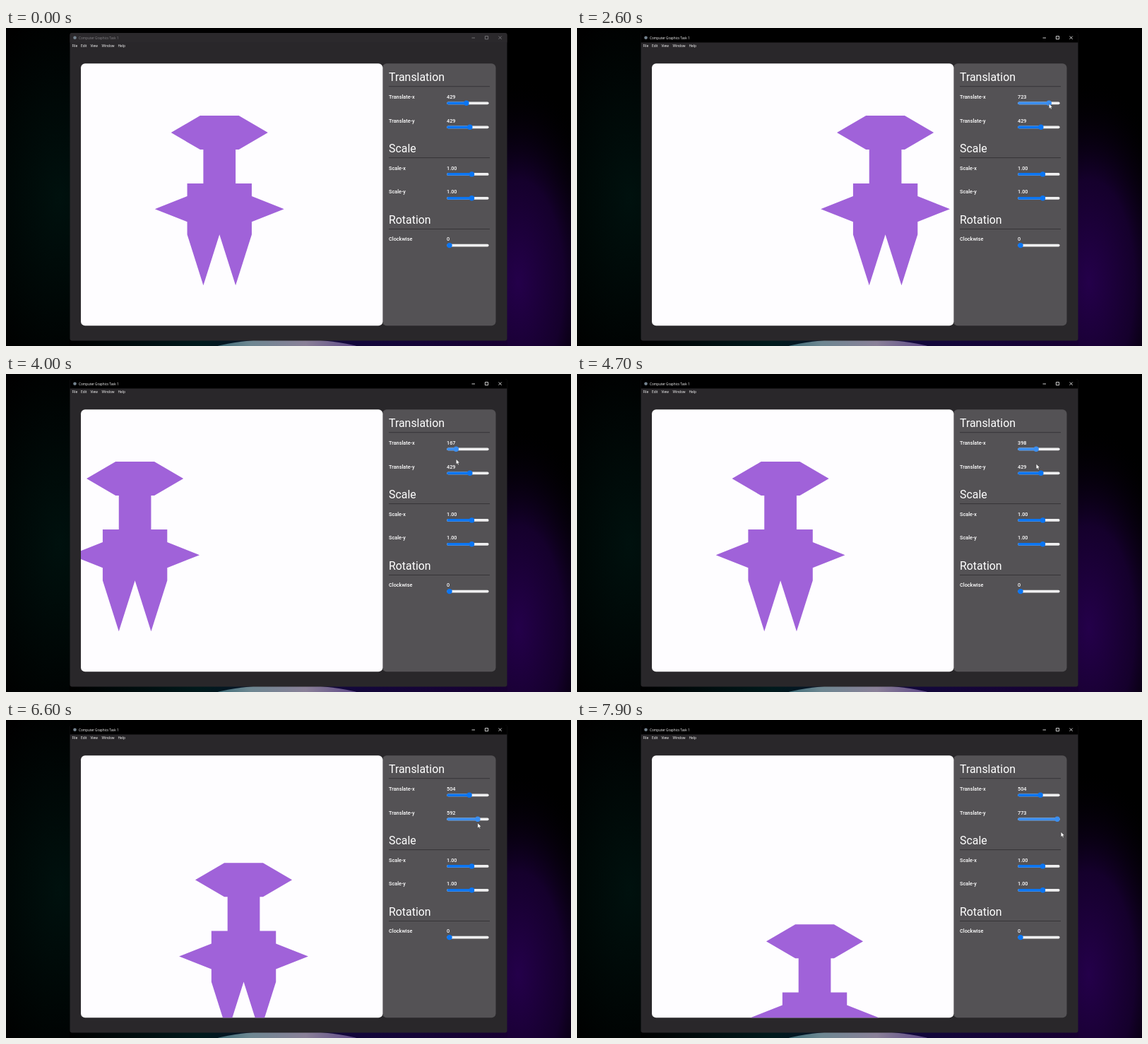
Animation of 800 by 450 pixels, one loop 8000 ms. Source, as an HTML page:

```html
<!DOCTYPE html>
<html lang="en">
<head>
<meta charset="utf-8">
<title>Transform sliders</title>
<style>
  html, body { margin: 0; width: 100%; height: 100%; overflow: hidden; background: #000; }
  svg { display: block; width: 100vw; height: 100vh; }
  text { fill: #fff; font: 500 7.3px Roboto, sans-serif; }
  .head { font-size: 15.9px; font-weight: 400; }
  .bar { font: 500 4.8px "Open Sans", sans-serif; }
  #title { font-size: 4.65px; }
</style>
</head>
<body>
<svg viewBox="0 0 800 450">
  <defs>
    <radialGradient id="green">
      <stop stop-color="#00110e"/><stop offset="1" stop-color="#000"/>
    </radialGradient>
    <radialGradient id="purple">
      <stop stop-color="#24004a"/><stop offset=".5" stop-color="#15002c"/>
      <stop offset="1" stop-color="#000" stop-opacity="0"/>
    </radialGradient>
    <linearGradient id="floor">
      <stop stop-color="#000"/><stop offset=".3" stop-color="#001a1c"/>
      <stop offset=".6" stop-color="#12083c"/><stop offset="1" stop-color="#180032"/>
    </linearGradient>
    <linearGradient id="glow">
      <stop stop-color="#1f5a66"/><stop offset=".3" stop-color="#6d8791"/>
      <stop offset=".6" stop-color="#8a8098"/><stop offset="1" stop-color="#4a2f80"/>
    </linearGradient>
    <clipPath id="view"><rect x="106" y="50.3" width="427.4" height="371" rx="6"/></clipPath>
  </defs>

  <rect width="800" height="450"/>
  <ellipse cx="75" cy="240" rx="130" ry="270" fill="url(#green)"/>
  <ellipse cx="725" cy="360" rx="130" ry="290" fill="url(#purple)"/>
  <rect x="90" y="440" width="620" height="10" fill="url(#floor)"/>
  <ellipse cx="398" cy="470" rx="132" ry="30" fill="url(#glow)"/>

  <rect x="90.5" y="7" width="619" height="435.5" rx="3" fill="#29272a"/>
  <path id="titleBar" d="M90.5 20.5V10a3 3 0 0 1 3-3h613a3 3 0 0 1 3 3v10.5z"/>
  <circle cx="97.5" cy="13.8" r="2.3" fill="#74838f"/>
  <text id="title" class="bar" x="103" y="15.6">Computer Graphics Task 1</text>
  <path id="buttons" fill="none" stroke-width=".8" d="M659.5 14h4.5M678.4 11.6h4.2v4.2h-4.2zM697.5 11.6l4.2 4.2m0-4.2l-4.2 4.2"/>
  <g class="menu">
    <text class="bar" y="26.6"><tspan x="93.5">File</tspan><tspan x="106">Edit</tspan><tspan x="119.5">View</tspan><tspan x="135.5">Window</tspan><tspan x="158.5">Help</tspan></text>
  </g>

  <rect x="533" y="50.3" width="160.5" height="371" rx="6" fill="#545255"/>
  <rect x="106" y="50.3" width="427.4" height="371" rx="6" fill="#fefdff"/>
  <g clip-path="url(#view)">
    <path id="shape" fill="#a062d9" d="M-150-225L-60-275H60L150-225L60-175H50V-75H100V-37.5L200 0L100 37.5V75L50 225L0 75L-50 225L-100 75V37.5L-200 0L-100-37.5V-75H-50V-175H-60z"/>
  </g>
  <g id="panel"></g>
  <path id="cursor" fill="#fff" stroke="#222" stroke-width=".4" d="M0 0V7.2L1.7 5.7L2.8 8.1L4 7.6L2.9 5.2H5.1z"/>
</svg>
<script>
const LOOP = 8000, STEP = 100;
const MAX_X = 933, MAX_Y = 773;
const ENTER = 600, GRAB_X = 1600, DROP_X = 5400, GRAB_Y = 5900;
const $ = id => document.getElementById(id);
const set = (id, name, value) => $(id).setAttribute(name, value);

function add(tag, attrs, text = '') {
  const el = document.createElementNS('http://www.w3.org/2000/svg', tag);
  for (const key in attrs) el.setAttribute(key, attrs[key]);
  el.textContent = text;
  $('panel').append(el);
  return el;
}

function heading(text, y) {
  add('text', { class: 'head', x: 542, y }, text);
  add('rect', { x: 542, y: y + 7, width: 143, height: 1, fill: '#363437' });
}

const thumbX = part => 628 + 52 * part;

// Returns a setter: fraction of the track, shown value, highlighted or not
function slider(label, y) {
  const track = { x: 624.3, y: y + 4.5, width: 59.3, height: 3.8, rx: 1.9 };
  add('text', { x: 542, y }, label);
  const value = add('text', { x: 624, y });
  add('rect', { ...track, fill: '#efeff0' });
  const fill = add('rect', track);
  const thumb = add('circle', { cy: y + 6.4, r: 3.7 });
  return (part, text, hot) => {
    const x = thumbX(part), color = hot ? '#3b8ef0' : '#0b75f2';
    value.textContent = text;
    fill.setAttribute('width', x - track.x);
    thumb.setAttribute('cx', x);
    fill.setAttribute('fill', color);
    thumb.setAttribute('fill', color);
  };
}

// Smooth moves through [time, value] stops
function glide(stops, t) {
  let [start, value] = stops[0];
  for (const [end, next] of stops) {
    const p = Math.min(1, Math.max(0, (t - start) / (end - start || 1)));
    value += (next - value) * p * p * (3 - 2 * p);
    start = end;
  }
  return value;
}

const dragX = [[GRAB_X, 429], [2600, 723], [3500, 28], [4700, 398], [5300, 504]];
const dragY = [[GRAB_Y, 429], [6600, 592], [7000, 25], [7500, 25], [7900, 850]];

// The pointer comes in, then stays on the dragged thumb and drifts down
function pointer(t, x, y) {
  if (t < GRAB_X) return [
    glide([[500, 484], [1200, 662], [GRAB_X, 652]], t),
    glide([[500, 402], [1200, 195], [GRAB_X, 106]], t)
  ];
  return [thumbX(t < GRAB_Y ? x / MAX_X : y / MAX_Y), 106 + Math.max(0, t - 2500) * .0097];
}

heading('Translation', 75.2);
const setX = slider('Translate-x', 99.9);
const setY = slider('Translate-y', 133.9);
heading('Scale', 176.1);
slider('Scale-x', 200.5)(.606, '1.00');
slider('Scale-y', 234.4)(.606, '1.00');
heading('Rotation', 277);
slider('Clockwise', 301.2)(0, '0');

function draw(now) {
  const t = Math.floor(now % LOOP / STEP) * STEP;
  const x = glide(dragX, t), pull = glide(dragY, t), y = Math.min(MAX_Y, pull);
  const focused = t >= GRAB_X, ink = focused ? '#fff' : '#858387';

  setX(x / MAX_X, Math.round(x), focused && t < DROP_X);
  setY(y / MAX_Y, Math.round(y), t >= GRAB_Y);
  set('shape', 'transform',
    `translate(${106.2 + x * .457} ${50 + y * .4805}) scale(.457 .4805)`);
  set('cursor', 'transform', `translate(${pointer(t, x, pull)})`);
  set('cursor', 'visibility', t < ENTER ? 'hidden' : 'visible');
  set('titleBar', 'fill', focused ? '#000' : '#2b292c');
  set('buttons', 'stroke', ink);
  $('title').style.fill = ink;
  requestAnimationFrame(draw);
}
requestAnimationFrame(draw);
</script>
</body>
</html>
```
